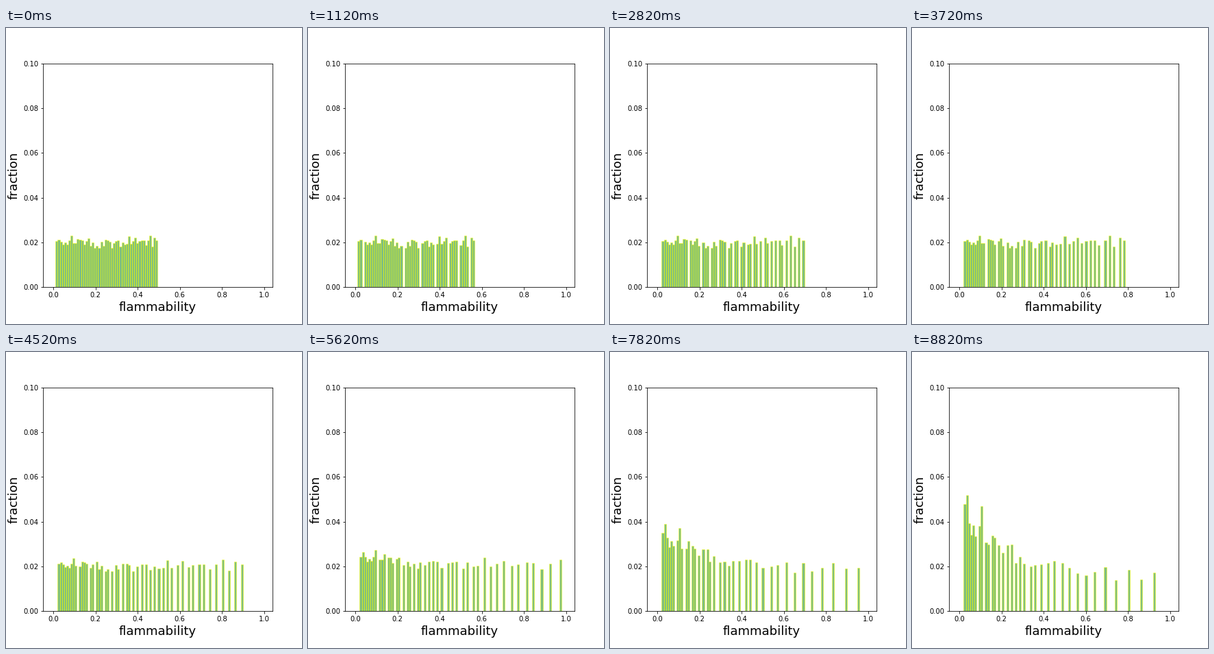
Recreate the animation shown at these times as a matplotlib script. Size 432x432 px, loop 8.92 s.

```python
import numpy as np
import matplotlib.pyplot as plt
from matplotlib.animation import FuncAnimation

plt.rcParams.update({
    "font.family": "DejaVu Sans",
    "font.size": 10,
    "figure.subplot.left": 0.125,
    "figure.subplot.right": 0.9,
    "figure.subplot.bottom": 0.125,
    "figure.subplot.top": 0.88,
})

TICK = 20           # ms per animation frame
STEPS = 90          # the first step lasts one tick, the others five
GROWTH = 0.02
BOOM, LATE, LAST = 44, 69, 89
EDGES = np.linspace(0, 1, 100)

strain = np.arange(2, 50)
rng = np.random.default_rng(7)


def noise(spread):
    return np.clip(rng.normal(0, spread, strain.size), -2 * spread, 2 * spread)


# Log of each strain's share at the start, and its gains by the two later times
start = np.log(0.0206) + noise(0.085)
late_gain = 0.36 - 0.0075 * strain + noise(0.04)
last_gain = 1.3 - 0.25 * np.sqrt(strain) + noise(0.08)


def shares(step):
    rise = np.clip((step - BOOM) / (LATE - BOOM), 0, 1)
    surge = np.clip((step - LATE) / (LAST - LATE), 0, 1) ** 1.3
    return np.exp(start + rise * late_gain + surge * (last_gain - late_gain))


def histograms():
    """Bar heights for every step; a strain grows with the square of its value."""
    value = strain / 100
    rows = []
    for step in range(STEPS):
        value = np.minimum(value + GROWTH * value ** 2, 2)
        rows.append(np.histogram(value, EDGES, weights=shares(step))[0])
    return rows


heights = histograms()

fig, ax = plt.subplots(figsize=(6, 6), dpi=72)
bars = ax.bar(EDGES[:-1], heights[0], width=EDGES[1], align="edge",
              lw=1, ec="yellow", fc="green", alpha=0.5)
ax.set_xlim(-0.0495, 1.0394)
ax.set_ylim(0, 0.1)
ax.set_xlabel("flammability", fontsize=18)
ax.set_ylabel("fraction", fontsize=18)


def update(frame):
    for bar, h in zip(bars, heights[(frame + 4) // 5]):
        bar.set_height(h)
        bar.set_visible(h > 0)
    return bars.patches


anim = FuncAnimation(fig, update, frames=(STEPS - 1) * 5 + 1, interval=TICK,
                     repeat=True, repeat_delay=0, blit=False)
plt.show()
```
